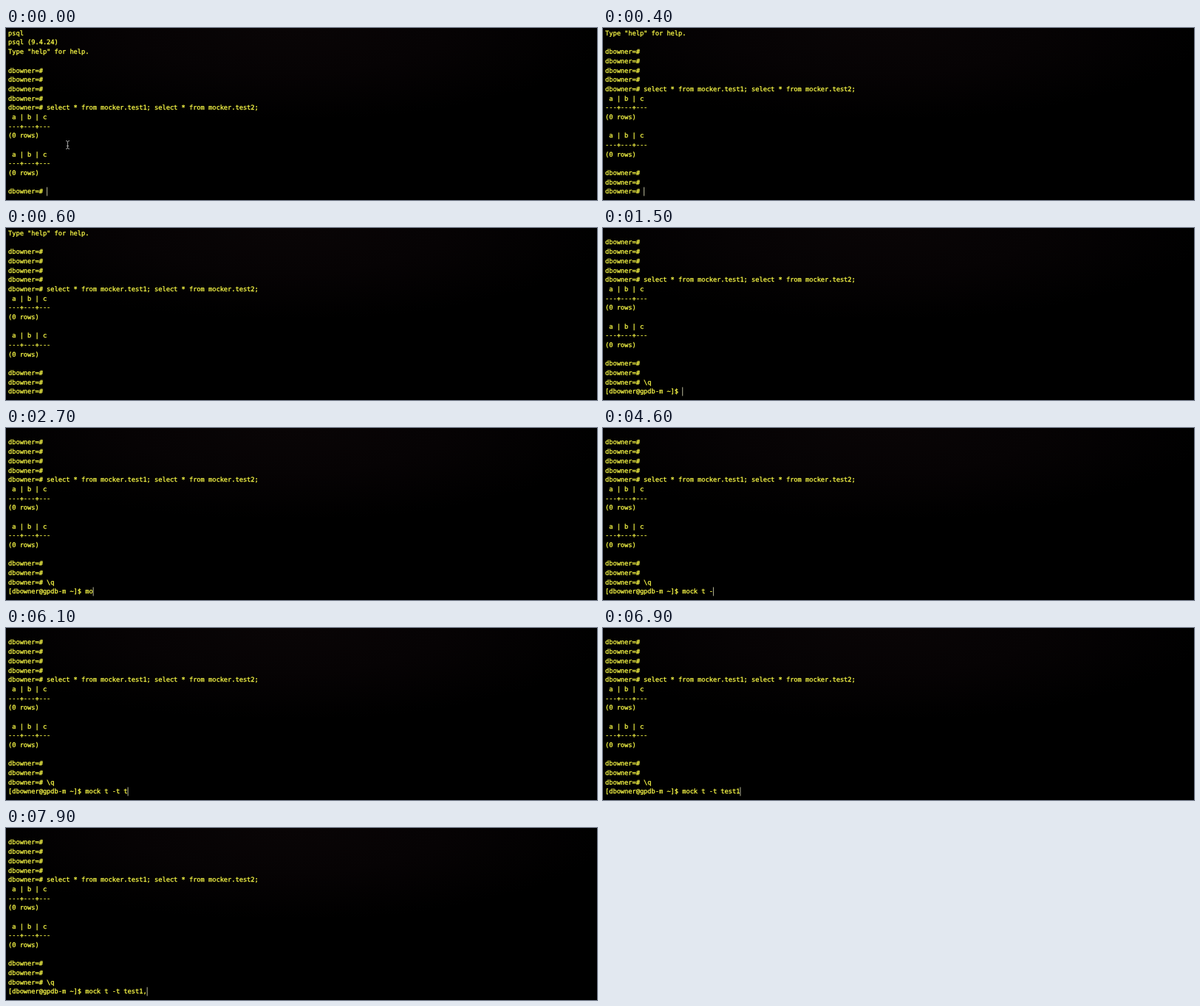
Animation, 800 px wide and 234 px high, one loop 8 s. Source, as an HTML page:

```html
<!DOCTYPE html>
<html lang="en">
<head>
<meta charset="utf-8">
<title>Terminal session</title>
<style>
  html, body { margin: 0; width: 100%; height: 100%; overflow: hidden; background: #000; }
  svg { display: block; width: 800px; height: 234px; }
  text {
    font: 8.663px "DejaVu Sans Mono", "Liberation Mono", monospace;
    fill: #ffff48;
    stroke: #ffff48;
    stroke-width: .28px;
    white-space: pre;
    text-rendering: geometricPrecision;
  }
</style>
</head>
<body>
<svg viewBox="0 0 800 234">
  <defs>
    <radialGradient id="glow" gradientUnits="userSpaceOnUse" cx="0" cy="0" r="1"
                    gradientTransform="translate(380 0) scale(440 125)">
      <stop offset="0" stop-color="#090506"/>
      <stop offset=".5" stop-color="#060304"/>
      <stop offset="1" stop-color="#000"/>
    </radialGradient>
  </defs>
  <rect width="800" height="234" fill="url(#glow)"/>
  <g id="screen"></g>
  <rect id="caret" y="216.5" width="1" height="12" fill="#b4b496"/>
  <path id="pointer" d="M81 153.5q2.5 0 2.5 1.5q0-1.5 2.5-1.5M83.5 155v8M81 164.5q2.5 0 2.5-1.5q0 1.5 2.5 1.5M82 160.5h3"
        fill="none" stroke="#b0b0b0" stroke-width=".9"/>
</svg>
<script>
const LOOP = 8000, ROWS = 18, LEFT = 3, BASELINE = 9.8, LINE = 12.68, CHAR = 5.215;
const DB = 'dbowner=# ', SHELL = '[dbowner@gpdb-m ~]$ ';
const table = [' a | b | c', '---+---+---', '(0 rows)', ''];

const history = [
  'psql', 'psql (9.4.24)', 'Type "help" for help.', '',
  DB, DB, DB, DB,
  DB + 'select * from mocker.test1; select * from mocker.test2;',
  ...table, ...table, DB
];

// [time in ms, key]
const keys = [
  [200, '\n'], [400, '\n'], [1200, '\\'], [1300, 'q'], [1500, '\n'],
  [2500, 'm'], [2700, 'o'], [2800, 'c'], [3000, 'k'],
  [4200, ' '], [4300, 't'], [4500, ' '], [4600, '-'], [4800, 't'], [5000, ' '],
  [6000, 't'], [6200, 'e'], [6300, 's'], [6500, 't'], [6700, '1'], [7000, ',']
];
const caretOff = [[500, 1000], [7500, 7800]];

const byId = id => document.getElementById(id);
const show = (node, on) => node.setAttribute('visibility', on ? 'visible' : 'hidden');
const caret = byId('caret'), pointer = byId('pointer');

const rows = Array.from({ length: ROWS }, (_, i) => {
  const row = document.createElementNS('http://www.w3.org/2000/svg', 'text');
  row.setAttribute('x', LEFT);
  row.setAttribute('y', BASELINE + i * LINE);
  return byId('screen').appendChild(row);
});

function linesAt(time) {
  const lines = [...history];
  for (const [at, key] of keys) {
    if (at > time) break;
    const last = lines.length - 1;
    if (key === '\n') lines.push(lines[last].endsWith('\\q') ? SHELL : DB);
    else lines[last] += key;
  }
  return lines.slice(-ROWS);
}

function draw(time) {
  const lines = linesAt(time);
  rows.forEach((row, i) => {
    if (row.textContent !== lines[i]) row.textContent = lines[i];
  });
  caret.setAttribute('x', LEFT + lines[ROWS - 1].length * CHAR - 0.1);
  show(caret, !caretOff.some(([from, to]) => time >= from && time < to));
  show(pointer, time < keys[0][0]);
}

const start = performance.now();
function tick() {
  draw((performance.now() - start) % LOOP);
  requestAnimationFrame(tick);
}
tick();
</script>
</body>
</html>
```
